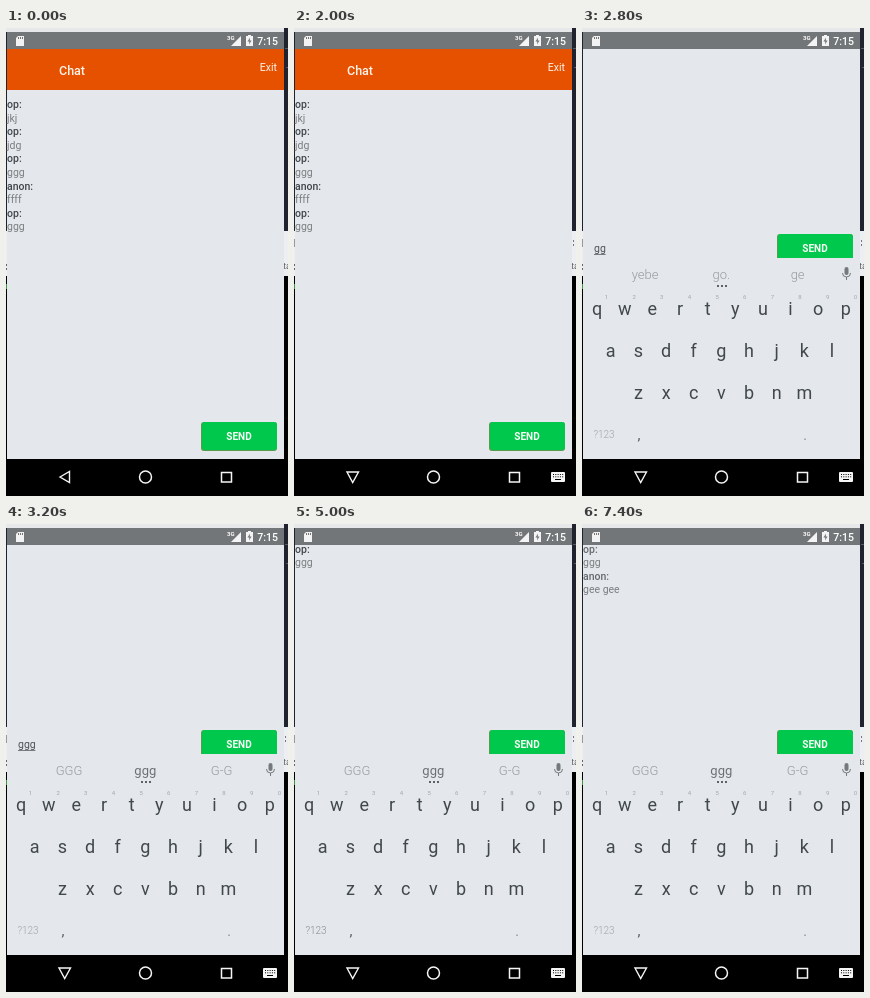
An HTML page with a canvas for the animation above (8200 ms loop, 282 by 468 pixels).

```html
<!DOCTYPE html>
<html lang="en">
<head>
<meta charset="utf-8">
<title>Chat on a phone</title>
<style>
html, body { margin: 0; width: 282px; height: 468px; overflow: hidden; background: #000; }
canvas { display: block; }
</style>
</head>
<body>
<canvas id="stage" width="282" height="468"></canvas>
<script>
const ctx = document.getElementById('stage').getContext('2d');
const LOOP = 8200;
const PAGE = '#e4e7eb';
const INK = '#40484d';
const FONT = 'Roboto, "Liberation Sans", sans-serif';

// Moments (ms) at which the screen switches
const SEAM = 800, FOCUS = 2000, KEYS = 2200, SETTLED = 2400, PRESS = 2600,
      TWO = 2800, THREE = 3000, SENT = 3800, SHARP = 5000, REPLY = 6800, SOFT = 7400;

const HISTORY = ['op:', 'jkj', 'op:', 'jdg', 'op:', 'ggg', 'anon:', 'ffff', 'op:', 'ggg'];

function rect(x, y, w, h, color) {
  ctx.fillStyle = color;
  ctx.fillRect(x, y, w, h);
}

function panel(x, y, w, h, r, color) {
  ctx.fillStyle = color;
  ctx.beginPath();
  ctx.roundRect(x, y, w, h, r);
  ctx.fill();
}

function text(str, x, y, size, color, weight = 400, align = 'left') {
  ctx.font = `${weight} ${size}px ${FONT}`;
  ctx.textAlign = align;
  ctx.fillStyle = color;
  ctx.fillText(str, x, y);
}

function poly(points, color, stroke) {
  ctx.beginPath();
  points.forEach(([x, y]) => ctx.lineTo(x, y));
  ctx.closePath();
  if (stroke) {
    ctx.strokeStyle = color;
    ctx.lineWidth = stroke;
    ctx.stroke();
  } else {
    ctx.fillStyle = color;
    ctx.fill();
  }
}

// Slivers of the desktop visible around the phone
function desktop(t) {
  rect(0, 0, 282, 468, '#000');
  rect(0, 0, 282, 203, '#20222e');
  rect(0, 203, 282, 45, '#eceef1');
  rect(0, 0, 278, 4, '#e6e8ea');
  rect(279, 20, 3, 1, '#555a68');
  rect(280, 39, 2, 1, '#555a68');
  rect(0, 236, 1, 2, '#666');
  rect(0, 240, 1, 2, '#666');
  rect(0, 256, 1, 5, '#3c9a35');
  text('ta', 277, 241, 9, '#555');
  if (t >= SEAM) {
    rect(0, 211, 1, 8, '#999');
    rect(279, 212, 1, 2, '#777');
    rect(279, 216, 1, 2, '#777');
  }
}

function statusBar() {
  rect(1, 4, 277, 17, '#737678');
  poly([[12, 8], [18, 8], [18, 18], [10, 18], [10, 10]], '#f2f2f2');
  rect(12, 9, 1, 2, '#737678');
  rect(14, 9, 1, 2, '#737678');
  rect(16, 9, 1, 2, '#737678');
  text('3G', 221, 12, 6, '#fff', 700);
  poly([[235, 8], [235, 18], [225, 18]], '#f4f4f4');
  rect(242, 7, 3, 2, '#f4f4f4');
  rect(240, 8, 7, 10, '#f4f4f4');
  poly([[244, 9.5], [241.5, 13.5], [243.3, 13.5], [243, 16.5], [245.6, 12.5], [243.8, 12.5]], '#737678');
  text('7:15', 272, 17, 10.5, '#fff', 500, 'right');
}

function sendButton(y) {
  panel(195, y, 76, 29, 3, '#5a9a4c');
  panel(196, y, 75, 28, 3, '#00c84c');
  text('SEND', 233, y + 18, 10, '#f4fff6', 700, 'center');
}

function messages(list, firstY, sharp) {
  list.forEach((line, i) => {
    const name = line.endsWith(':');
    const color = name ? (sharp ? '#41464a' : '#666a6d') : '#7b7e80';
    text(line, 1, firstY + i * 13.6, 10.5, color, name ? 500 : 400);
  });
}

function chatScreen() {
  rect(1, 21, 277, 41, '#e65100');
  text('Chat', 53, 47, 12.5, '#fff3ea', 500);
  text('Exit', 271, 43, 10.5, '#fff3ea', 400, 'right');
  messages(HISTORY, 80, true);
  sendButton(394);
}

function keyRow(letters, x, y) {
  [...letters].forEach((c, i) => text(c, x + i * 27.65, y, 18, INK, 400, 'center'));
}

function mic() {
  panel(262.5, 239, 4, 8, 2, '#73797d');
  ctx.strokeStyle = '#73797d';
  ctx.lineWidth = 1;
  ctx.beginPath();
  ctx.arc(264.5, 245, 4, 0, Math.PI);
  ctx.moveTo(264.5, 249);
  ctx.lineTo(264.5, 252);
  ctx.stroke();
}

function suggestions(t) {
  if (t < TWO) return;
  const words = t < THREE ? ['yebe', 'go.', 'ge'] : ['GGG', 'ggg', 'G-G'];
  words.forEach((w, i) => {
    const main = i === 1 && t >= THREE;
    text(w, 63 + i * 76.3, 251, 13, main ? '#6b7175' : '#969b9f', main ? 400 : 300, 'center');
  });
  for (let i = 0; i < 3; i++) rect(135 + i * 4, 257, 2, 2, '#5c6266');
}

function keyboard(t) {
  rect(1, 230, 277, 201, PAGE);
  mic();
  suggestions(t);
  [...'1234567890'].forEach((d, i) =>
    text(d, 24.5 + i * 27.65, 271, 6, '#a2a7ab', 400, 'center'));
  keyRow('qwertyuiop', 15, 287);
  keyRow('asdfghjkl', 28.7, 329);
  keyRow('zxcvbnm', 56.5, 371);
  const sharp = t >= SHARP && t < SOFT;
  text('?123', 22, 410, 10, sharp ? '#888d91' : '#a0a5a9', 300, 'center');
  text(',', 57, 412, 15, '#596066', 400, 'center');
  text('.', 223, 412, 14, '#858b90', 400, 'center');
  if (t >= PRESS && t < TWO) {
    panel(124, 268, 32, 64, 2, '#eff1f3');
    text('g', 139.3, 291, 18, INK, 400, 'center');
  }
}

function typingScreen(t) {
  sendButton(t < SETTLED ? 207 : 206);
  if (t >= TWO && t < SENT) {
    const typed = t < THREE ? 'gg' : 'ggg';
    text(typed, 12, 224, 10.5, '#4d5256');
    rect(12, 226, typed.length * 5.8, 1, '#777c80');
  }
  if (t >= SENT) {
    const list = ['op:', 'ggg'];
    if (t >= REPLY) list.push('anon:', 'gee gee');
    messages(list, 28.5, t >= SHARP && t < SOFT);
  }
  keyboard(t);
}

function navBar(t) {
  rect(0, 431, 282, 37, '#000');
  const white = '#f5f5f5';
  if (t < FOCUS) poly([[54, 449], [63.5, 443.5], [63.5, 454.5]], white, 1.4);
  else poly([[53, 444], [64.5, 444], [58.7, 454.5]], white, 1.4);
  ctx.strokeStyle = white;
  ctx.lineWidth = 1.5;
  ctx.beginPath();
  ctx.arc(139.5, 449, 6, 0, Math.PI * 2);
  ctx.stroke();
  ctx.strokeRect(215.5, 444.5, 10, 9.5);
  if (t < FOCUS) return;
  panel(257, 444, 14, 10, 1, white);
  for (let row = 0; row < 2; row++)
    for (let col = 0; col < 5; col++) rect(259 + col * 2.3, 446 + row * 2.3, 1, 1, '#000');
  rect(261, 451, 6, 1, '#000');
}

function draw(t) {
  desktop(t);
  rect(1, 21, 277, 410, PAGE);
  statusBar();
  if (t < KEYS) chatScreen();
  else typingScreen(t);
  navBar(t);
}

const start = performance.now();
function tick() {
  draw((performance.now() - start) % LOOP);
  requestAnimationFrame(tick);
}
tick();
</script>
</body>
</html>
```
